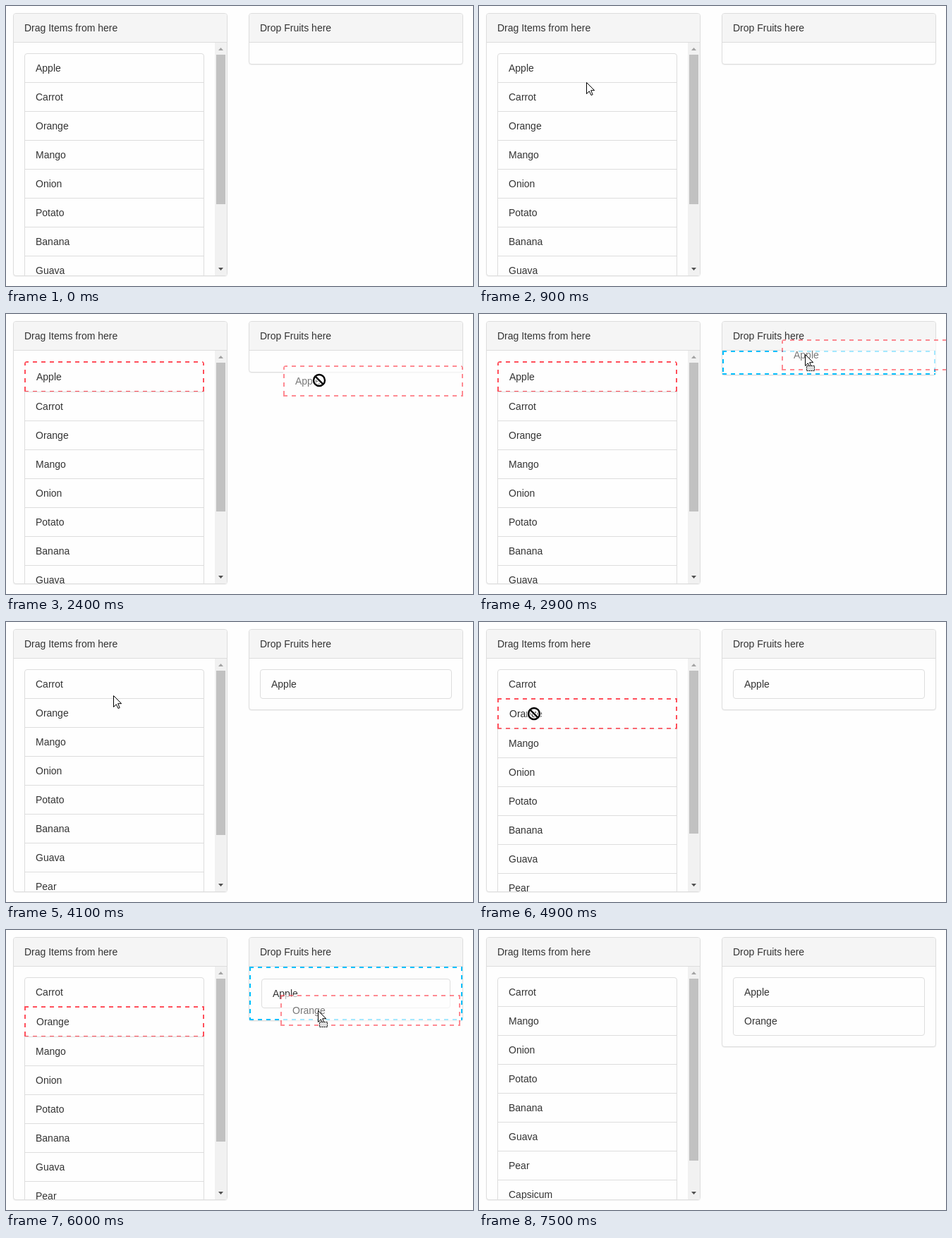
Animation of 662x397 px, one loop 8300 ms. Source, as an HTML page:

```html
<!DOCTYPE html>
<html lang="en">
<head>
<meta charset="utf-8">
<title>Drag and drop list</title>
<style>
  * { box-sizing: border-box; }
  html, body { margin: 0; width: 100%; height: 100%; overflow: hidden; background: #fefefe; }
  body { position: relative; font: 14px/20px "Liberation Sans", Arial, sans-serif; color: #333; }
  .panel {
    position: absolute; top: 10px; width: 304px; background: #fefefe;
    border: 1px solid #ddd; border-radius: 4px; box-shadow: 0 1px 1px rgba(0, 0, 0, .05);
  }
  #from { left: 10px; height: 373px; }
  #to { left: 344px; }
  .head {
    height: 41px; padding: 10px 15px; background: #f5f5f5;
    border-bottom: 1px solid #ddd; border-radius: 3px 3px 0 0;
  }
  .body { position: relative; padding: 15px; }
  #from .body { height: 330px; padding-right: 32px; overflow: hidden; }
  ul { list-style: none; margin: 0; padding: 0; }
  li {
    position: relative; padding: 10px 15px; margin-bottom: -1px;
    background: #fefefe; border: 1px solid #ddd;
  }
  li:first-child, .first { border-top-left-radius: 4px; border-top-right-radius: 4px; }
  li:last-child { margin-bottom: 0; border-bottom-left-radius: 4px; border-bottom-right-radius: 4px; }
  .drag { --dash: #ff4f5b; }
  .over { --dash: #00bfff; }
  /* Even 6px dashes and gaps on all four sides */
  .drag, .over {
    --row: repeating-linear-gradient(90deg, var(--dash) 0 6px, transparent 6px 12px);
    --col: repeating-linear-gradient(180deg, var(--dash) 0 6px, transparent 6px 12px);
    border: 2px solid transparent;
    background:
      var(--row) top / 100% 2px no-repeat border-box,
      var(--row) bottom / 100% 2px no-repeat border-box,
      var(--col) left / 2px 100% no-repeat border-box,
      var(--col) right / 2px 100% no-repeat border-box,
      #fefefe;
  }
  .bar { position: absolute; top: 0; right: 0; width: 17px; height: 330px; background: #f1f1f1; }
  #thumb { position: absolute; left: 2px; top: 17px; width: 13px; background: #c1c1c1; }
  .bar svg { position: absolute; left: 0; top: 0; }
  #ghost {
    position: absolute; left: 0; top: 0; width: 255px; height: 44px; padding: 10px 15px;
    opacity: .65;
  }
  #cursor { position: absolute; left: 0; top: 0; overflow: visible; }
</style>
</head>
<body>
<div class="panel" id="from">
  <div class="head">Drag Items from here</div>
  <div class="body">
    <ul id="source"></ul>
    <div class="bar">
      <div id="thumb"></div>
      <svg width="17" height="330">
        <path d="M5 11h7l-3.5-4z" fill="#a3a3a3"/>
        <path d="M5 319h7l-3.5 4z" fill="#505050"/>
      </svg>
    </div>
  </div>
</div>
<div class="panel" id="to">
  <div class="head">Drop Fruits here</div>
  <div class="body" id="drop"><ul id="target"></ul></div>
</div>
<div id="ghost" class="drag"></div>
<svg id="cursor" width="1" height="1">
  <g id="arrow">
    <path d="M.5 .5V16.5L4.3 12.8L7 18.5L9.2 17.6L6.7 11.7H11.7Z" fill="#fff" stroke="#000"/>
    <rect id="parcel" x="2.5" y="16.5" width="11" height="7" fill="#ddd" stroke="#000" stroke-dasharray="2 1"/>
  </g>
  <g id="banned" fill="none">
    <path id="sign" d="M-8 0a8 8 0 1 0 16 0a8 8 0 1 0-16 0M-5.6-5.6L5.6 5.6"/>
    <use href="#sign" stroke="#fff" stroke-width="4.5"/>
    <use href="#sign" stroke="#000" stroke-width="2.4"/>
  </g>
</svg>
<script>
const LOOP = 8300, STEP = 100, LAG = 26;
const ITEMS = ['Apple', 'Carrot', 'Orange', 'Mango', 'Onion', 'Potato', 'Banana', 'Guava', 'Pear', 'Capsicum'];
const $ = id => document.getElementById(id);

const speedUp = p => k => k ** p;
const slowDown = p => k => 1 - (1 - k) ** p;

// The hand travels from move to move; bend pushes the middle of a move sideways
const ENTRY = [621, 74];
const moves = [
  { start: 200, end: 1200, to: [60, 88], ease: slowDown(1.5), bend: [0, 45] },
  { start: 1500, end: 1800, to: [90, 92], ease: speedUp(1.3) },
  { start: 1900, end: 2400, to: [444, 94], ease: speedUp(1) },
  { start: 2400, end: 2900, to: [462, 57], ease: slowDown(2), bend: [30, 0] },
  { start: 3500, end: 4500, to: [78, 130], ease: slowDown(1.8), bend: [0, -21] },
  { start: 4800, end: 5400, to: [190, 123], ease: speedUp(5) },
  { start: 5400, end: 6000, to: [442, 114], ease: slowDown(1.7) },
  { start: 7000, end: 7400, to: [634, 64], ease: speedUp(1.5) }
];
const drags = [
  { name: 'Apple', start: 1500, end: 3400, grab: [33, 21] },
  { name: 'Orange', start: 4800, end: 6700, grab: [52, 22] }
];

function hand(t) {
  let pos = ENTRY;
  for (const { start, end, to, ease, bend = [0, 0] } of moves) {
    if (t <= start) break;
    const k = ease(Math.min(1, (t - start) / (end - start)));
    pos = pos.map((p, i) => p + (to[i] - p) * k + bend[i] * Math.sin(Math.PI * k));
  }
  return pos;
}

function place(el, [x, y]) { el.style.transform = `translate(${Math.round(x)}px, ${Math.round(y)}px)`; }
function show(el, on) { el.style.display = on ? '' : 'none'; }

function fill(list, names, dragged) {
  list.replaceChildren(...names.map(name => {
    const li = document.createElement('li');
    li.textContent = name;
    li.classList.toggle('drag', name === dragged);
    return li;
  }));
}

let last = -1;
function draw(t) {
  const dropped = drags.filter(d => t >= d.end).map(d => d.name);
  const drag = drags.find(d => t >= d.start && t < d.end);
  const left = ITEMS.filter(name => !dropped.includes(name));
  const [x, y] = hand(t);
  const over = !!drag && x > 345 && y < 82 + 42 * dropped.length;

  fill($('source'), left, drag && drag.name);
  fill($('target'), dropped);
  const content = 51 + 41 * left.length + (drag ? 2 : 0);
  $('thumb').style.height = Math.round(296 * 330 / content) + 'px';
  $('drop').classList.toggle('over', over);

  show($('ghost'), drag);
  if (drag) {
    const pulled = hand(Math.max(drag.start, t - LAG));
    $('ghost').textContent = drag.name;
    $('ghost').classList.toggle('first', drag.name === left[0]);
    place($('ghost'), pulled.map((p, i) => p - drag.grab[i]));
  }

  show($('cursor'), t >= 200 && t < 7500);
  show($('arrow'), !drag || over);
  show($('parcel'), over);
  show($('banned'), drag && !over);
  place($('cursor'), [x, y]);
}

function tick() {
  const t = Math.floor(performance.now() % LOOP / STEP) * STEP;
  if (t !== last) draw(last = t);
  requestAnimationFrame(tick);
}
tick();
</script>
</body>
</html>
```
